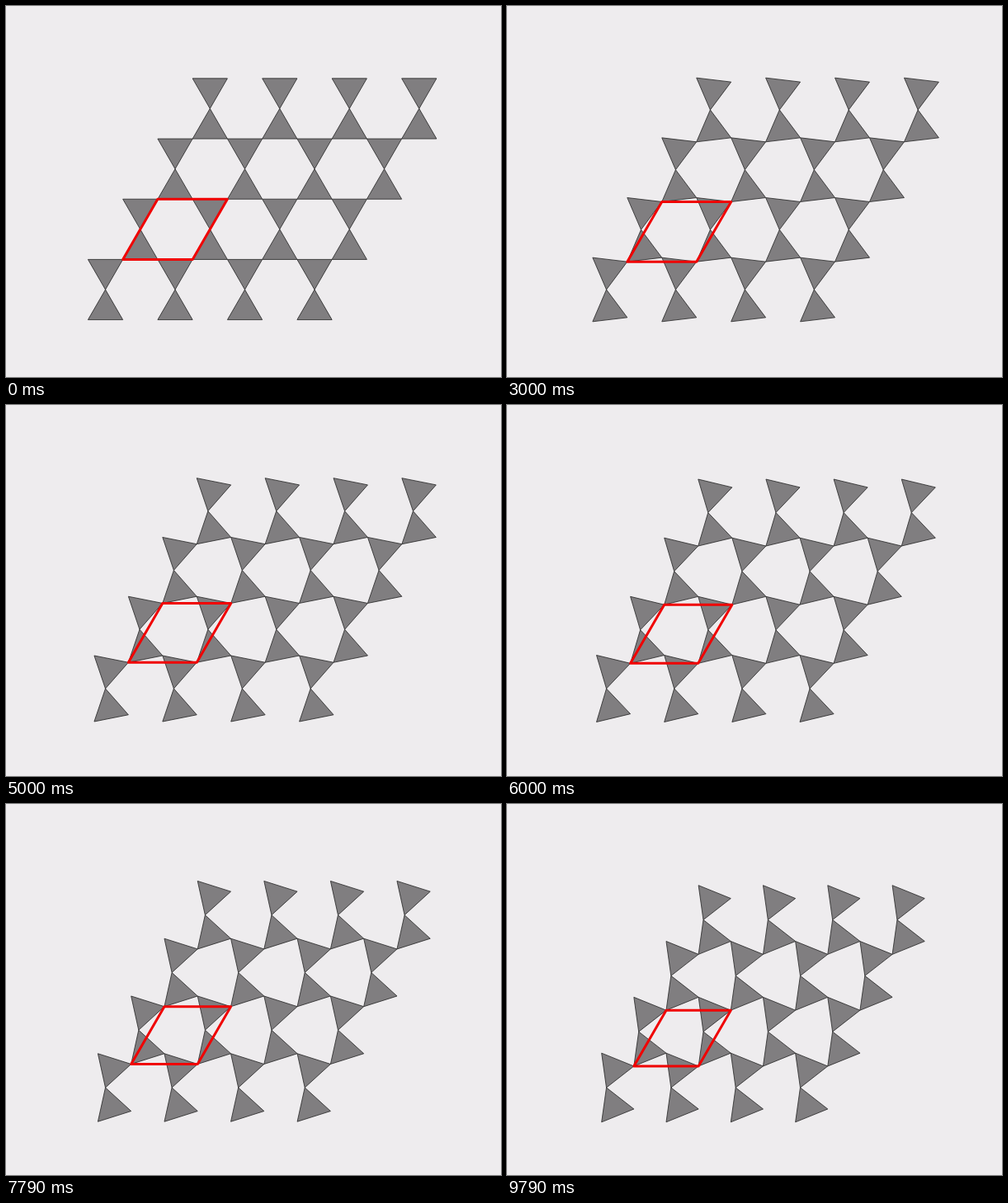
An HTML page with a canvas for the animation above (10000 ms loop, 600 by 450 pixels).

```html
<!DOCTYPE html>
<html lang="en">
<head>
<meta charset="utf-8">
<title>Twisting kagome lattice</title>
<style>
  html, body { margin: 0; width: 100%; height: 100%; overflow: hidden; background: #eeecee; }
  canvas { display: block; }
</style>
</head>
<body>
<canvas id="stage" width="600" height="450"></canvas>
<script>
const ctx = document.getElementById('stage').getContext('2d');
const LOOP = 10000, STEPS = 50, MAX_TWIST = Math.PI / 8;
const SIDE = 42.25, COUNT = 4;
const ORIGIN = { x: 120.5, y: 344 };
const JITTER = [0, 10, -10, 10, -10];

const stepStart = i => i * LOOP / STEPS + JITTER[i % 5];

function stepAt(time) {
  let step = 0;
  while (step + 1 < STEPS && stepStart(step + 1) <= time) step++;
  return step;
}

// Point at a distance of one side from p; angle clockwise from the x axis.
const along = (p, angle) => ({
  x: p.x + SIDE * Math.cos(angle),
  y: p.y + SIDE * Math.sin(angle)
});

function tracePolygon(points) {
  ctx.beginPath();
  for (const p of points) ctx.lineTo(p.x, p.y);
  ctx.closePath();
}

function drawTriangle(apex, angle) {
  tracePolygon([apex, along(apex, angle), along(apex, angle + Math.PI / 3)]);
  ctx.fill();
  ctx.stroke();
}

function draw(time) {
  const twist = MAX_TWIST * stepAt(time) / STEPS;
  const cell = 2 * SIDE * Math.cos(twist);
  const rise = cell * Math.sqrt(3) / 2;
  const site = (col, row, from = ORIGIN) => ({
    x: from.x + cell * (col + row / 2),
    y: from.y - rise * row
  });

  ctx.fillStyle = '#eeecee';
  ctx.fillRect(0, 0, 600, 450);

  ctx.fillStyle = '#807e80';
  ctx.strokeStyle = '#222';
  ctx.lineWidth = 0.8;
  ctx.lineJoin = 'miter';
  for (let row = 0; row < COUNT; row++) {
    for (let col = 0; col < COUNT; col++) {
      const apex = site(col, row);
      drawTriangle(apex, -2 * Math.PI / 3 + twist);
      drawTriangle(apex, Math.PI / 3 - twist);
    }
  }

  // Unit cell
  const corner = along(ORIGIN, -Math.PI / 3 + twist);
  tracePolygon([[0, 0], [1, 0], [1, 1], [0, 1]].map(([c, r]) => site(c, r, corner)));
  ctx.strokeStyle = '#f00000';
  ctx.lineWidth = 3;
  ctx.lineJoin = 'round';
  ctx.stroke();
}

function frame() {
  draw(performance.now() % LOOP);
  requestAnimationFrame(frame);
}
frame();
</script>
</body>
</html>
```
